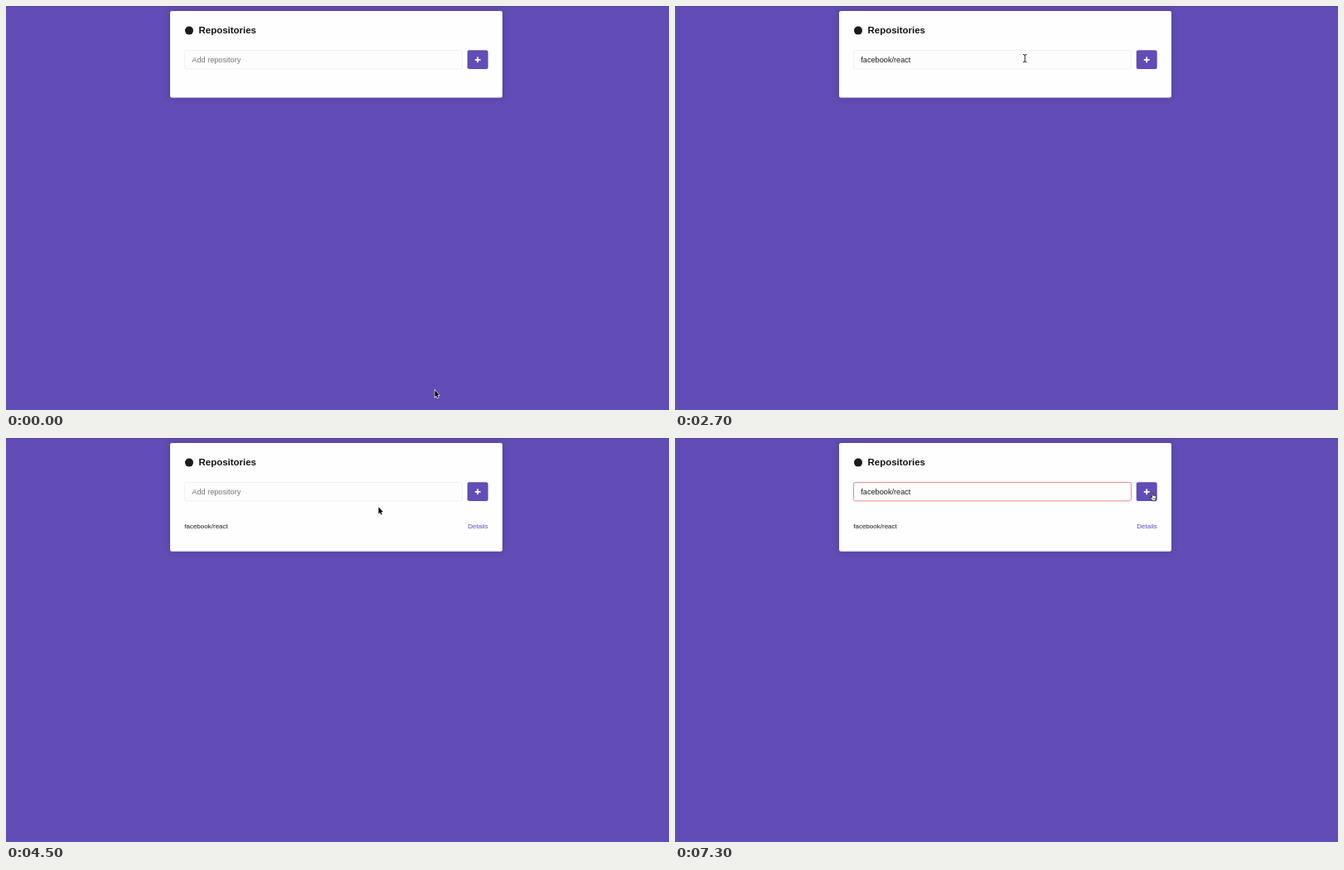
Write an HTML page with a canvas that moves like this. It is 800x487 px and loops after 8000 ms.

```html
<!DOCTYPE html>
<html lang="en">
<head>
<meta charset="utf-8">
<title>Repositories</title>
<style>
  html, body { margin: 0; width: 100%; height: 100%; overflow: hidden; background: #624cb5; }
  canvas { display: block; width: 800px; height: 487px; }
</style>
</head>
<body>
<canvas id="stage" width="800" height="487"></canvas>
<script>
const ctx = document.getElementById('stage').getContext('2d');
const LOOP = 8000, STEP = 100;
const PURPLE = '#624cb5', WHITE = '#fefefe', INK = '#1c1c1e';
const FONT = '"Liberation Sans", Arial, sans-serif';
const REPO = 'facebook/react';

// Pointer way-points: time, x, y, shape from that time on
const PATH = [
  [0, 517, 463, 'arrow'], [100, 514, 436, 'arrow'], [200, 501, 345, 'arrow'],
  [400, 461, 108, 'arrow'], [500, 446, 38, 'arrow'], [600, 437, 13, 'arrow'],
  [700, 431, 29, 'arrow'], [800, 427, 53, 'arrow'], [900, 423.5, 61.5, 'beam'],
  [1000, 422.2, 63, 'beam'], [2700, 422.2, 63, 'beam'], [2800, 427, 63, 'beam'],
  [3000, 465, 66, 'beam'], [3200, 525, 71, 'beam'], [3300, 547, 72, 'beam'],
  [3400, 562, 75, 'hand'], [3500, 567.5, 77, 'hand'], [3900, 567.5, 77, 'hand'],
  [4000, 563, 80, 'arrow'], [4200, 515, 90, 'arrow'], [4400, 459, 88, 'arrow'],
  [4500, 449, 83, 'arrow'], [4600, 441, 78, 'arrow'], [4700, 448, 72, 'beam'],
  [4800, 460, 69, 'beam'], [4900, 463.7, 68.3, 'beam'], [6100, 463.7, 68.3, 'beam'],
  [6200, 468, 68, 'beam'], [6400, 505, 67, 'beam'], [6600, 552, 66, 'arrow'],
  [6700, 572, 67, 'hand'], [6800, 582, 66, 'arrow'], [6900, 577, 71, 'hand']
];

const within = (t, ...spans) => spans.some(([a, b]) => t >= a && t < b);

function pointerAt(t) {
  let i = 0;
  while (i < PATH.length - 1 && PATH[i + 1][0] <= t) i++;
  const a = PATH[i], b = PATH[i + 1] || a;
  const k = b === a ? 0 : (t - a[0]) / (b[0] - a[0]);
  return { x: a[1] + (b[1] - a[1]) * k, y: a[2] + (b[2] - a[2]) * k, shape: a[3] };
}

function box(x, y, w, h, r, fill, stroke, line) {
  ctx.beginPath();
  ctx.roundRect(x, y, w, h, r);
  if (fill) { ctx.fillStyle = fill; ctx.fill(); }
  if (stroke) { ctx.strokeStyle = stroke; ctx.lineWidth = line; ctx.stroke(); }
}

function disc(x, y, r, fill) {
  ctx.beginPath();
  ctx.arc(x, y, r, 0, Math.PI * 2);
  ctx.fillStyle = fill;
  ctx.fill();
}

function text(str, x, y, size, fill, weight = 'normal', align = 'left') {
  ctx.font = `${weight} ${size}px ${FONT}`;
  ctx.textAlign = align;
  ctx.fillStyle = fill;
  ctx.fillText(str, x, y);
}

function card(h) {
  ctx.save();
  ctx.shadowColor = 'rgba(0,0,0,.16)';
  ctx.shadowBlur = 10;
  box(198, 6, 401, h, 2.3, WHITE);
  ctx.restore();
  disc(221, 29.6, 5, INK);
  text('Repositories', 232.5, 33.3, 11.46, '#141416', 'bold');
}

function button(busy, t) {
  box(556.7, 53.3, 25, 22.8, 2.3, busy ? '#a194d3' : PURPLE);
  const x = 569.2, y = 64.8;
  if (!busy) {
    box(x - 3.5, y - .85, 7, 1.7, .4, '#fff');
    box(x - .85, y - 3.5, 1.7, 7, .4, '#fff');
    return;
  }
  for (let i = 0; i < 8; i++) {
    const a = i * Math.PI / 4 + t / 1000 * Math.PI;
    disc(x + Math.cos(a) * 3.2, y + Math.sin(a) * 3.2, .75, '#fff');
  }
}

function trace(points) {
  ctx.beginPath();
  points.forEach(([x, y]) => ctx.lineTo(x, y));
  ctx.closePath();
}

const SHAPES = {
  arrow() {
    trace([[.5, .3], [.5, 8.3], [2.3, 6.7], [3.5, 9.5], [4.8, 9], [3.6, 6.2], [5.9, 6.1]]);
    ctx.strokeStyle = '#fff';
    ctx.lineWidth = 1.2;
    ctx.stroke();
    ctx.fillStyle = '#000';
    ctx.fill();
  },
  beam() {
    ctx.beginPath();
    ctx.moveTo(-2.2, -4.6);
    ctx.quadraticCurveTo(0, -4.6, 0, -3.2);
    ctx.quadraticCurveTo(0, -4.6, 2.2, -4.6);
    ctx.moveTo(0, -3.6);
    ctx.lineTo(0, 3.8);
    ctx.moveTo(-2.2, 4.8);
    ctx.quadraticCurveTo(0, 4.8, 0, 3.4);
    ctx.quadraticCurveTo(0, 4.8, 2.2, 4.8);
    ctx.strokeStyle = '#222';
    ctx.lineWidth = 1;
    ctx.stroke();
  },
  hand() {
    trace([[-2, -4.3], [-1.2, -4.9], [-.5, -4.2], [-.2, -1.6], [.8, -1.9], [1.5, -1.3],
      [2.4, -1.4], [2.9, -.8], [3.7, -.6], [3.8, 1.2], [2.9, 3.1], [2.8, 4.7],
      [-1.4, 4.7], [-1.8, 3.3], [-3.7, .6], [-3.2, -.1], [-1.5, 1]]);
    ctx.fillStyle = '#fff';
    ctx.fill();
    ctx.strokeStyle = '#111';
    ctx.lineWidth = .8;
    ctx.lineJoin = 'round';
    ctx.stroke();
    ctx.beginPath();
    for (const x of [-.2, 1.1, 2.3]) {
      ctx.moveTo(x, 1.2);
      ctx.lineTo(x, 3.2);
    }
    ctx.lineWidth = .5;
    ctx.stroke();
  }
};

function draw(t) {
  const listed = t >= 3700;
  const failed = t >= 7300;
  const filled = within(t, [2200, 3700], [5600, LOOP]);
  const caret = within(t, [1200, 1700], [2200, 2700], [4900, 5400], [5600, 6100]);
  const busy = within(t, [3600, 3700], [7000, 7300]);

  ctx.fillStyle = PURPLE;
  ctx.fillRect(0, 0, 800, 487);
  ctx.fillStyle = '#55449a';
  ctx.fillRect(0, 0, 800, 1);

  card(listed ? 130.8 : 104.5);
  box(215.5, 53.5, 335, 22.4, 2.3, '#fdfdfd', failed ? '#e58a8a' : '#ececec', failed ? 1 : .8);
  text(filled ? REPO : 'Add repository', 224.3, 67.8, 9.17, filled ? INK : '#757575');
  if (caret) {
    ctx.fillStyle = '#333';
    ctx.fillRect(filled ? 285 : 224.5, 60, .8, 10);
  }
  button(busy, t);
  if (listed) {
    text(REPO, 215.2, 109.3, 8.02, INK);
    text('Details', 581.7, 109.3, 8.02, PURPLE, 'normal', 'right');
  }

  const p = pointerAt(t);
  ctx.save();
  ctx.translate(p.x, p.y);
  SHAPES[p.shape]();
  ctx.restore();
}

const start = performance.now();
function tick() {
  const t = (performance.now() - start) % LOOP;
  draw(Math.floor(t / STEP) * STEP);
  requestAnimationFrame(tick);
}
tick();
</script>
</body>
</html>
```
